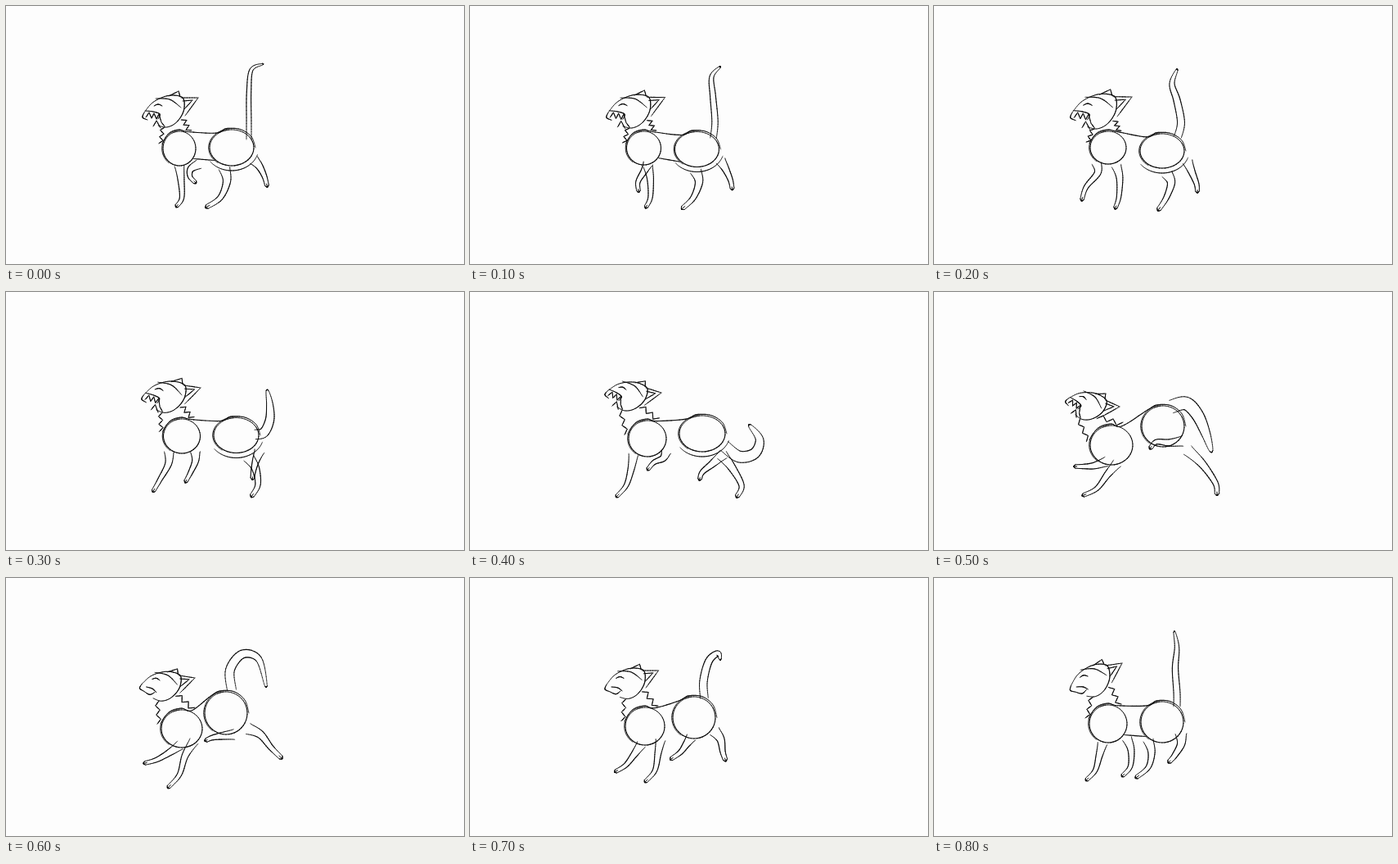
Recreate the animation shown at these times as an HTML page with a canvas. Size 560 by 315 pixels, loop 900 ms.

```html
<!DOCTYPE html>
<html lang="en">
<head>
<meta charset="utf-8">
<title>Cat walk sketch</title>
<style>
  html, body { margin: 0; width: 100%; height: 100%; overflow: hidden; background: #fdfdfd; }
  canvas { display: block; }
</style>
</head>
<body>
<canvas id="stage" width="560" height="315"></canvas>
<script>
const ctx = document.getElementById('stage').getContext('2d');
const STEP = 100;
// Key pose shown at each step; halves are in-betweens.
const timing = [0, .5, 1, 1.5, 2, 3, 4, 4.5, 5];

// One row per key pose. Limbs and tail are joints from root to tip.
const foreA = [
  [212, 195, 214, 212, 215, 234, 209, 244],
  [223, 195, 227, 210, 226, 233, 222, 246],
  [240, 195, 236, 203, 225, 208, 218, 216],
  [211, 207, 196, 212, 183, 213, 173, 213],
  [213, 204, 200, 213, 184, 222, 170, 226],
  [206, 202, 202, 217, 197, 235, 187, 246]];
const foreB = [
  [236, 193, 226, 199, 225, 208, 231, 215],
  [199, 192, 200, 204, 186, 221, 181, 236],
  [200, 198, 197, 216, 191, 236, 180, 249],
  [224, 209, 212, 223, 199, 240, 183, 248],
  [230, 199, 219, 217, 212, 240, 199, 255],
  [236, 196, 241, 210, 240, 230, 231, 241]];
const hindA = [
  [267, 198, 270, 214, 262, 234, 246, 245],
  [285, 205, 290, 216, 284, 234, 275, 248],
  [308, 199, 320, 214, 332, 236, 327, 249],
  [310, 193, 328, 210, 344, 233, 346, 246],
  [296, 184, 311, 191, 324, 207, 336, 219],
  [302, 190, 302, 203, 294, 217, 288, 224]];
const hindB = [
  [303, 188, 310, 196, 316, 208, 319, 219],
  [310, 190, 315, 202, 321, 217, 322, 226],
  [310, 198, 296, 210, 284, 220, 281, 228],
  [304, 182, 288, 184, 272, 183, 265, 190],
  [279, 191, 263, 193, 252, 195, 245, 198],
  [262, 198, 266, 213, 262, 231, 248, 243]];
const tail = [
  [297, 163, 297, 140, 297, 105, 300, 78, 314, 71],
  [298, 160, 302, 142, 297, 115, 291, 95, 297, 78],
  [311, 188, 329, 201, 348, 197, 354, 180, 342, 163],
  [290, 140, 308, 136, 322, 150, 332, 172, 339, 194],
  [276, 137, 274, 112, 289, 93, 309, 99, 318, 132],
  [297, 157, 297, 140, 295, 110, 297, 85, 294, 66]];
const fluff = [[3], [4.5], [7], [8], [5.5], [4]];
// Centre and radii.
const chest = [[212, 174, 20, 21], [213, 173, 22, 20], [217, 179, 23, 22],
  [217, 187, 26, 24], [215, 184, 25, 23], [213, 178, 23, 23]];
const hip = [[276, 173, 27, 22], [279, 177, 27, 21], [284, 173, 28, 22],
  [280, 164, 26, 25], [269, 165, 26, 26], [279, 176, 26, 25]];
// Nose and ear tip place the whole head.
const head = [[168, 132, 235, 112], [168, 132, 242, 111], [167, 122, 234, 123],
  [163, 131, 227, 140], [165, 131, 231, 122], [167, 133, 230, 104]];

const skull = [169, 130, 178, 119, 190, 112, 203, 109, 216, 112, 218, 124, 214, 135, 206, 144, 196, 148, 186, 146];
const features = [[169, 130, 167, 136, 173, 139], [183, 113, 200, 114, 214, 124], [181, 122, 186, 120, 191, 122]];
const ears = [[199, 110, 211, 104, 213, 111], [214, 112, 235, 112, 219, 134], [216, 116, 228, 115, 218, 126]];
const openMouth = [170, 128, 180, 129, 188, 132, 186, 138];
const teeth = [[171, 136, 175, 130, 178, 137, 181, 131, 184, 138, 187, 132, 190, 142, 194, 147], [180, 147, 184, 140, 189, 149]];
const closedMouth = [[175, 133, 183, 134, 189, 138], [173, 139, 181, 142, 187, 138]];

const mix = (a, b, t) => a + (b - a) * t;
const pairs = flat => flat.flatMap((x, i) => i % 2 ? [] : [[x, flat[i + 1]]]);

function poseOf(track, key) {
  const from = track[Math.floor(key)], to = track[Math.ceil(key)];
  return from.map((value, i) => mix(value, to[i], key % 1));
}

const spline = (a, b, c, d, t) =>
  b + t / 2 * (c - a + t * (2 * a - 5 * b + 4 * c - d + t * (3 * (b - c) + d - a)));

function smooth(points, detail = 8) {
  const at = i => points[Math.max(0, Math.min(points.length - 1, i))];
  const curve = [points[0]];
  for (let i = 0; i < points.length - 1; i++)
    for (let k = 1; k <= detail; k++)
      curve.push([0, 1].map(axis =>
        spline(at(i - 1)[axis], at(i)[axis], at(i + 1)[axis], at(i + 2)[axis], k / detail)));
  return curve;
}

// Pencil line: thin at both ends, heavier in the middle.
function ink(curve, weight = 1.15) {
  for (let i = 1; i < curve.length; i++) {
    ctx.lineWidth = weight * (.5 + .5 * Math.sin(Math.PI * i / curve.length));
    ctx.beginPath();
    ctx.moveTo(...curve[i - 1]);
    ctx.lineTo(...curve[i]);
    ctx.stroke();
  }
}

const curved = points => ink(smooth(points));
const jagged = points => points.slice(1).forEach((p, i) => ink(smooth([points[i], p]), 1.1));

// Outline around a centre line; halfWidth takes 0 at the root to 1 at the tip.
function ribbon(joints, halfWidth) {
  const spine = smooth(pairs(joints));
  const last = spine.length - 1;
  const side = sign => spine.map(([x, y], i) => {
    const [ax, ay] = spine[Math.max(0, i - 1)], [bx, by] = spine[Math.min(last, i + 1)];
    const reach = sign * halfWidth(i / last) / Math.hypot(bx - ax, by - ay);
    return [x - (by - ay) * reach, y + (bx - ax) * reach];
  });
  const left = side(1), right = side(-1);
  const [tx, ty] = spine[last], [px, py] = spine[last - 1];
  const length = Math.hypot(tx - px, ty - py), cap = halfWidth(1) * .9;
  const tip = [tx + (tx - px) / length * cap, ty + (ty - py) / length * cap];
  ink(left);
  ink(right);
  curved([left[last], tip, right[last]]);
  return { spine, tip };
}

function leg(joints, thickness) {
  const { spine, tip } = ribbon(joints, t => thickness * (2.7 + 4.3 * (1 - t) ** 2));
  ink(smooth([spine[spine.length - 3], tip], 4), .9);
}

function onOval([cx, cy, rx, ry], angle, grow = 1) {
  return [cx + (rx + grow) * Math.cos(angle), cy + (ry + grow) * Math.sin(angle)];
}

function arc(oval, start, end, grow, weight) {
  ink(Array.from({ length: 49 }, (_, i) => onOval(oval, mix(start, end, i / 48), grow)), weight);
}

function circle(oval) {
  arc(oval, -2, 4.6, 0, 1.2);
  arc(oval, 2.2, 4.8, 1.2, .8);
}

// Fur edge between two points, with spikes to one side.
function tuft([ax, ay], [bx, by], spike) {
  const length = Math.hypot(bx - ax, by - ay);
  jagged(Array.from({ length: 6 }, (_, i) => {
    const out = i % 2 ? spike / length : 0;
    return [mix(ax, bx, i / 5) - (by - ay) * out, mix(ay, by, i / 5) + (bx - ax) * out];
  }));
}

// Turns and scales head points so that nose and ear tip land where given.
function headPlacer([nx, ny, ex, ey]) {
  const [baseX, baseY, earX, earY] = head[0];
  const ux = earX - baseX, uy = earY - baseY, vx = ex - nx, vy = ey - ny;
  const size = ux * ux + uy * uy;
  const c = (vx * ux + vy * uy) / size, s = (vy * ux - vx * uy) / size;
  return ([x, y]) => [nx + (x - baseX) * c - (y - baseY) * s, ny + (x - baseX) * s + (y - baseY) * c];
}

function drawHead(place, calm) {
  const placed = flat => pairs(flat).map(place);
  curved(placed(skull));
  features.forEach(line => curved(placed(line)));
  ears.forEach(line => jagged(placed(line)));
  if (calm) {
    closedMouth.forEach(line => curved(placed(line)));
  } else {
    curved(placed(openMouth));
    teeth.forEach(line => jagged(placed(line)));
  }
}

function draw(key) {
  ctx.fillStyle = '#fdfdfd';
  ctx.fillRect(0, 0, 560, 315);
  ctx.strokeStyle = '#0c0c0c';
  ctx.lineCap = 'round';

  const ribs = poseOf(chest, key), rump = poseOf(hip, key);
  const place = headPlacer(poseOf(head, key));
  drawHead(place, key >= 4);
  tuft(place([194, 148]), onOval(ribs, 3.4), 5);
  tuft(place([214, 139]), onOval(ribs, -1.1), -6);

  circle(ribs);
  circle(rump);
  curved([...[-2.9, -2.2, -1.6, -1.1].map(a => onOval(ribs, a, 2)),
    ...[-2.3, -1.8, -1.2, -.6, 0].map(a => onOval(rump, a, 2))]);
  if (key < 1 || key === 5) {
    const from = onOval(ribs, .6), to = onOval(rump, 2.4);
    curved([from, [mix(from[0], to[0], .5), mix(from[1], to[1], .5)], to]);
  }
  if (key <= 2) arc(rump, 2.5, .3, 6, 1);

  leg(poseOf(foreA, key), .85);
  leg(poseOf(foreB, key), .85);
  leg(poseOf(hindA, key), 1);
  leg(poseOf(hindB, key), .9);
  const [bushy] = poseOf(fluff, key);
  ribbon(poseOf(tail, key), t => bushy * (1 - .75 * t ** 3));
}

function tick() {
  draw(timing[Math.floor(performance.now() / STEP) % timing.length]);
  requestAnimationFrame(tick);
}
tick();
</script>
</body>
</html>
```
